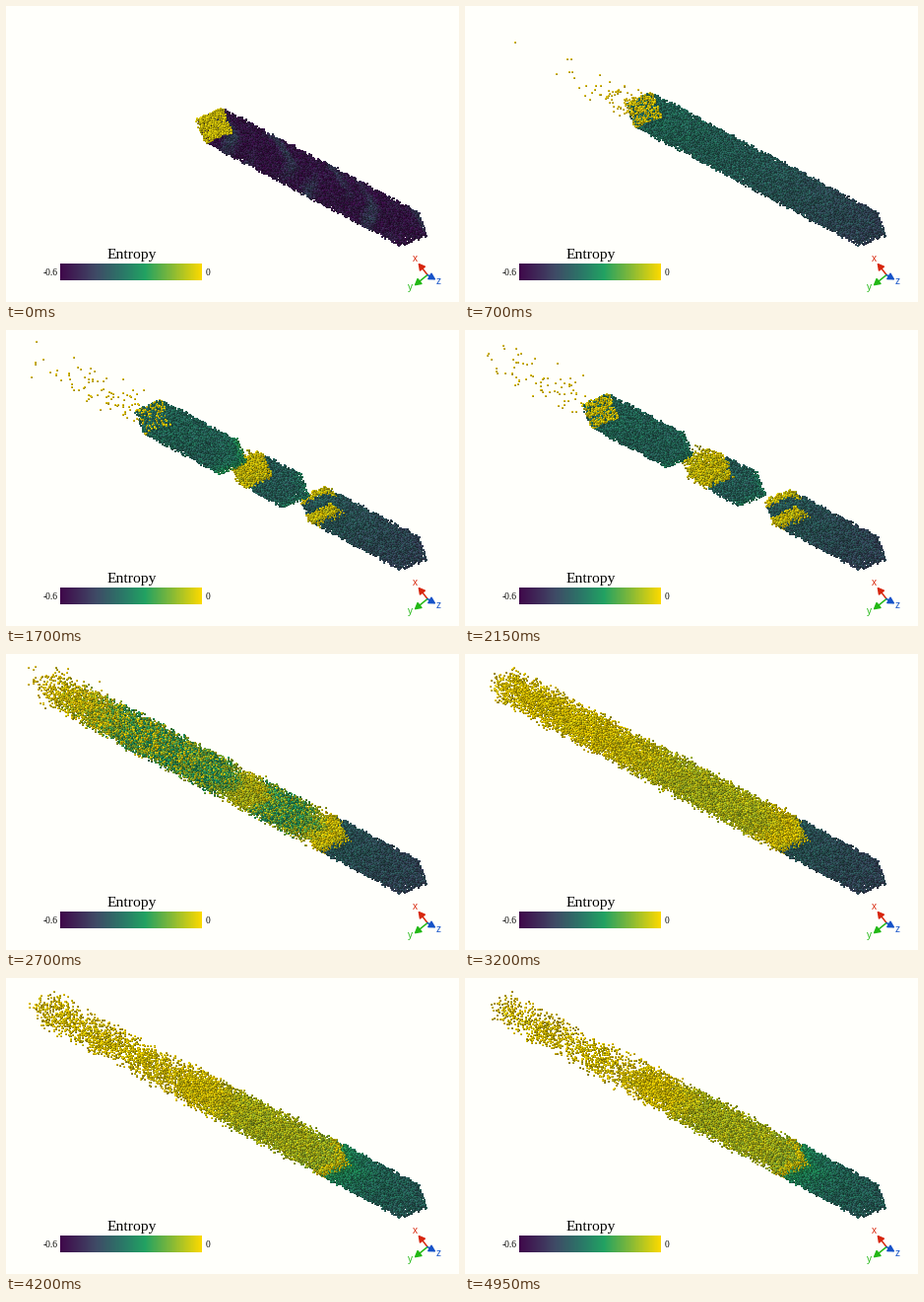
Write a matplotlib script that moves like this. It is 460 by 300 pixels and loops after 5 s.

```python
import numpy as np
import matplotlib.pyplot as plt
from matplotlib.animation import FuncAnimation
from matplotlib.colors import LinearSegmentedColormap

W, H, DPI = 460, 300, 80
FRAMES, STEP = 100, 50
BACK = np.array([1.0, 1.0, 0.985])

ENTROPY = LinearSegmentedColormap.from_list("entropy", [
    (0, "#40094b"), (0.25, "#3f4a66"), (0.45, "#2a7a68"),
    (0.6, "#22a262"), (0.78, "#7fb83a"), (1, "#fbd900")])

# Bar cross-section vectors and the axis slope on screen
U, V, SLOPE = np.array([27, -12]), np.array([9, 24]), 0.529
SPLITS = [0, 0.375, 0.557, 1]
TIMES = [0, 0.7, 1.7, 2.15]
# Left and right end of each of the three fragments at TIMES
ENDS = [([210, 180, 148, 136], [285, 266, 227, 214]),
        ([285, 266, 246, 250], [321, 308, 291, 288]),
        ([321, 308, 314, 320], [410, 410, 410, 410])]
GAS_LEFT, GAS_RIGHT = 39, 322

rng = np.random.default_rng(7)
N, SKIN = 36000, 350
s = np.concatenate([rng.random(N), rng.random(SKIN) * 0.004])
N += SKIN
u, v = rng.random((2, N))
chance, delay, noise, shade = rng.random((4, N))
shade = 0.72 + 0.36 * shade
noise = noise - 0.5
rough = rng.normal(0, 0.5, (N, 2))
scatter = rng.normal(0, 1.5, (N, 2))
piece = np.searchsorted(SPLITS[1:3], s, side="right")
SPRITE = [(0, 0, 1.0), (1, 0, 0.88), (0, 1, 0.84), (1, 1, 0.62)]

DROPS = 95
drop_speed = 44 + rng.exponential(24, DROPS)
drop_speed[0] = 228
drop_start = (rng.random((DROPS, 1)) - 0.5) * U * 0.8 + (rng.random((DROPS, 1)) - 0.5) * V * 0.8
drop_drift = rng.normal(0, 4, DROPS)


def smooth(x):
    x = np.clip(x, 0, 1)
    return x * x * (3 - 2 * x)


def axis_y(x):
    return 226 - (410 - x) * SLOPE


def fragments(t):
    """Axis position of each atom and its distance from both fragment ends."""
    x = np.empty(N)
    left = np.empty(N)
    right = np.empty(N)
    for k, (lo, hi) in enumerate(ENDS):
        m = piece == k
        a, b = np.interp(t, TIMES, lo), np.interp(t, TIMES, hi)
        x[m] = a + (s[m] - SPLITS[k]) / (SPLITS[k + 1] - SPLITS[k]) * (b - a)
        left[m], right[m] = x[m] - a, b - x[m]
    return x, left, right


def solid_value(t, x, left, right):
    bands = np.sin(31 * s + 3 * u - 2 * v) * np.sin(13 * s + 1)
    cold = 0.07 + 0.17 * np.clip(bands, 0, 1) + 0.12 * noise
    warm = 0.45 - 0.17 * s ** 1.4 + 0.1 * noise
    value = cold + (warm - cold) * smooth(t / 0.4)

    crack = smooth((t - 0.7) / 0.9)
    value += 0.28 * crack * (piece == 0) * np.exp(-right / 7) * (1 - 0.6 * smooth((t - 1.7) / 0.45))
    value += 0.15 * crack * (piece == 1) * np.exp(-right / 7)

    late = smooth((t - 3.2) / 0.9)
    value += (piece == 2) * late * (0.32 * np.exp(-left / 15) + 0.11)

    patch = (piece == 1) | ((piece == 2) & ((abs(v - 0.5) > 0.22) | (t > 2.6)))
    reach = 9 * crack * (0.5 + chance)
    hot = patch & (piece > 0) & (left < reach)
    value[hot] = 0.95 + 0.1 * noise[hot]

    face = (s < 0.01) & (chance < np.interp(t, TIMES, [1, 0.75, 0.35, 0.8]))
    value[face] = 0.96
    return value, hot


def gas_value(t, x):
    late = smooth((t - 3.2) / 1)
    early = np.interp(x, [40, 150, 220, 290, 315], [1, 0.97, 0.89, 0.9, 0.98])
    after = np.interp(x, [40, 195, 235, 300, 325], [1, 0.98, 0.89, 0.89, 0.82])
    return early + (after - early) * late + 0.1 * noise


def gas_density(t, x):
    stops = [3, 3.2, 4.2, 5]
    left = np.interp(t, stops, [0.4, 0.3, 0.15, 0.1])
    mid = np.interp(t, stops, [0.85, 0.7, 0.22, 0.16])
    clumps = 1 + 0.35 * np.sin(x / 8 + 2 * t) * smooth((t - 3.5) / 1)
    return np.interp(x, [40, 165, 235], [left, mid, 1]) * clumps


def paint(img, pos, color):
    """Stamp a small shaded dot for each position, later ones on top."""
    px = np.rint(pos).astype(int)
    cols = np.stack([px[:, 0] + dx for dx, _, _ in SPRITE], 1).ravel()
    rows = np.stack([px[:, 1] + dy for _, dy, _ in SPRITE], 1).ravel()
    rgb = np.stack([color * f for _, _, f in SPRITE], 1).reshape(-1, 3)
    ok = (cols >= 17) & (cols < W) & (rows >= 8) & (rows < H)
    img[rows[ok], cols[ok]] = rgb[ok]


def render(t):
    img = np.tile(BACK, (H, W, 1))
    x, left, right = fragments(t)
    value, hot = solid_value(t, x, left, right)
    x = x - hot * (piece == 1) * chance ** 2 * 20 * smooth((t - 1.5) / 0.6)

    # The two left fragments boil off and fill the whole length
    p = smooth((t - 2.2 - 0.35 * delay) / 0.5) * (piece < 2)
    q = (s / SPLITS[2] - 0.1 * max(0, t - 3)) % 1
    x = x + (GAS_LEFT + (GAS_RIGHT - GAS_LEFT) * q - x) * p
    value = value + (gas_value(t, x) - value) * p
    seen = chance < 1 - p * (1 - gas_density(t, x))

    pos = np.stack([x, axis_y(x)], 1) + (u - 0.5)[:, None] * U + (v - 0.5)[:, None] * V
    pos += rough + scatter * p[:, None] - 0.5
    color = ENTROPY(np.clip(value, 0, 1))[:, :3] * shade[:, None]

    depth = 6.6 * u + 6.9 * v - 3.15 * x
    order = np.argsort(depth)
    order = order[seen[order]]
    paint(img, pos[order], np.clip(color[order], 0, 1))

    if t > 0:
        dx = 206 - drop_speed * t
        drops = np.stack([dx, axis_y(dx) + drop_drift * t], 1) + drop_start
        live = (drops[:, 0] > 20) & (drops[:, 0] < np.interp(t, TIMES, ENDS[0][0]) + 8) & (t < 2.9)
        paint(img, drops[live], np.tile([0.92, 0.8, 0.08], (live.sum(), 1)))
    return img


fig = plt.figure(figsize=(W / DPI, H / DPI), dpi=DPI, facecolor=BACK)
ax = fig.add_axes([0, 0, 1, 1])
ax.axis("off")
stage = ax.imshow(render(0), extent=(0, W, H, 0), interpolation="nearest", aspect="auto")
ax.imshow(np.linspace(0, 1, 144)[None], cmap=ENTROPY, extent=(55, 199, 278, 261),
          interpolation="nearest", aspect="auto", zorder=2)
ax.set_xlim(0, W)
ax.set_ylim(H, 0)


def label(x, y, text, px, color="black", font="Liberation Serif", ha="center"):
    ax.text(x, y, text, fontsize=px * 72 / DPI, color=color, family=font,
            ha=ha, va="baseline", zorder=4)


label(128, 256, "Entropy", 15.5)
label(52.5, 273, "-0.6", 9.5, ha="right")
label(203, 273, "0", 9.5, ha="left")

AXES = [("x", (418.5, 260.5), (415.5, 259), "#d8260c"),
        ("y", (414.5, 283.5), (410.5, 288.5), "#22b814"),
        ("z", (436.5, 277.5), (439.5, 282), "#1452c8")]
for name, tip, spot, color in AXES:
    ax.annotate("", tip, (428, 272.5), zorder=3,
                arrowprops=dict(arrowstyle="-|>,head_length=0.5,head_width=0.28", color=color,
                                lw=1.35, mutation_scale=10, shrinkA=0, shrinkB=0))
    label(*spot, name, 10, color, "Liberation Sans")


def update(i):
    stage.set_data(render(i * STEP / 1000))
    return [stage]


anim = FuncAnimation(fig, update, frames=FRAMES, interval=STEP, repeat=True, repeat_delay=0)
plt.show()
```
